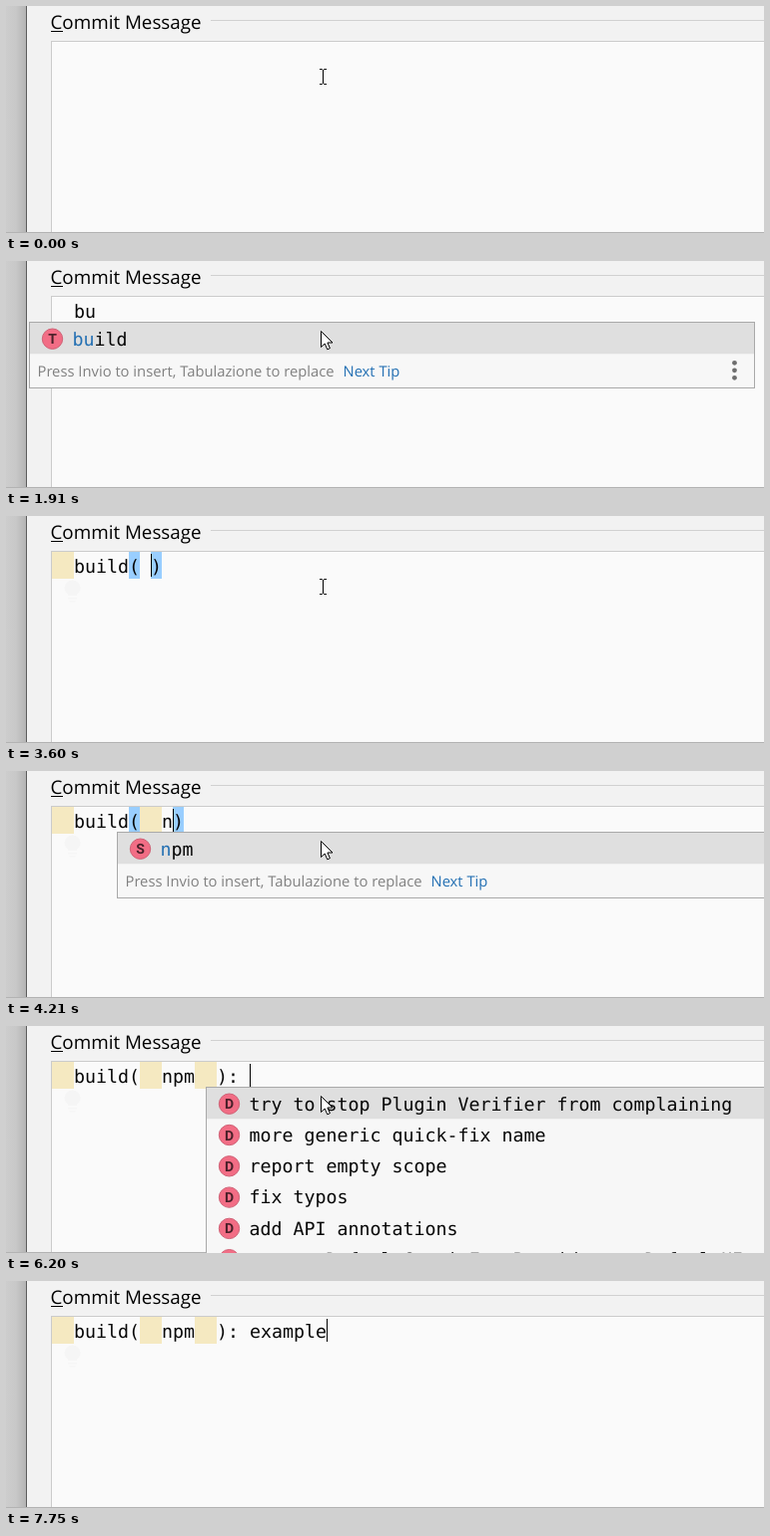
Animation of 759x228 px, one loop 8000 ms. Source, as an HTML page:

```html
<!DOCTYPE html>
<html lang="en">
<head>
<meta charset="utf-8">
<title>Commit message completion</title>
<style>
  html, body { margin: 0; width: 100%; height: 100%; overflow: hidden; background: #f2f2f2; }
  svg { display: block; width: 759px; height: 228px; }
  text { white-space: pre; text-rendering: geometricPrecision; }
  .ui { font-family: "Open Sans", "Noto Sans", sans-serif; }
  .code { font: 18.27px "DejaVu Sans Mono", monospace; fill: #080808; }
  .letter { font: 700 14px Roboto, Arial, sans-serif; fill: #4a2029; text-anchor: middle; }
  .hit { fill: #2470b3; }
</style>
</head>
<body>
<svg viewBox="0 0 759 228" xmlns="http://www.w3.org/2000/svg">
  <defs>
    <linearGradient id="shade">
      <stop offset="0" stop-color="#cdcdcd"/>
      <stop offset=".5" stop-color="#c8c8c8"/>
      <stop offset="1" stop-color="#b4b4b4"/>
    </linearGradient>
  </defs>
  <rect width="759" height="228" fill="#f2f2f2"/>
  <rect width="20" height="228" fill="url(#shade)"/>
  <rect x="20" width="1" height="228" fill="#5c5c5c"/>
  <text class="ui" x="44.5" y="23" font-size="18.8">Commit Message</text>
  <rect x="45" y="25" width="12" height="1"/>
  <rect x="205" y="14" width="554" height="1" fill="#d1d1d1"/>
  <rect x="45.5" y="35.5" width="720" height="200" fill="#fafafa" stroke="#cbcbcb"/>
  <rect y="227" width="759" height="1" fill="#b3b3b3"/>
  <g id="scene"></g>
</svg>
<script>
const LOOP = 8000, LEFT = 46, CHAR = 11, ROW = 31.3;
const scene = document.getElementById('scene');

const popup = (x, icon, hit, items) => ({ x, icon, hit, items });
const scopes = ['gulp', 'broccoli', 'npm'];
const recent = [
  'try to stop Plugin Verifier from complaining',
  'more generic quick-fix name',
  'report empty scope',
  'fix typos',
  'add API annotations',
  'rename DefaultCommitFormProvider to DefaultUI'
];
const withE = [
  'extract completion logic',
  'enable scope inspection',
  'report empty scope',
  'ensure footer is separated',
  'handle end of line',
  'improve error messages'
];
const head = '  build(  npm  ): ';
const indent = [0, 2], before = [8, 2];

// Each step lists only what changes; marks are [column, length].
const steps = [
  [0, { text: '', caret: -1, mouse: 'beam', marks: [], parens: false, bulb: '', popup: null }],
  [180, { text: ' ', caret: 1, mouse: '' }],
  [360, { text: '  ', caret: 2 }],
  [790, { text: '  b', caret: 3, mouse: 'arrow', popup: popup(23, 'T', 'b', ['build']) }],
  [970, { text: '  bu', caret: 4, popup: popup(23, 'T', 'bu', ['build']) }],
  [1910, { caret: -1 }],
  [2030, { text: '  build', caret: 7, mouse: 'beam', popup: null }],
  [2340, { marks: [indent] }],
  [2790, { bulb: 'on' }],
  [2910, { caret: -1 }],
  [3090, { text: '  build()', caret: 8, parens: true, bulb: 'faint', mouse: 'arrow', popup: popup(90, 'S', '', scopes) }],
  [3600, { text: '  build( )', caret: 9, mouse: 'beam', popup: null }],
  [3780, { text: '  build(  )', caret: 10, mouse: '' }],
  [3900, { marks: [indent, before] }],
  [4210, { text: '  build(  n)', caret: 11, mouse: 'arrow', popup: popup(111, 'S', 'n', ['npm']) }],
  [4390, { text: '  build(  np)', caret: 12, popup: popup(111, 'S', 'np', ['npm']) }],
  [4640, { text: '  build(  npm)', caret: 13, marks: [indent, [8, 5]], mouse: 'beam', popup: null }],
  [4890, { text: '  build(  npm )', caret: 14, mouse: '' }],
  [4950, { text: '  build(  npm  )', caret: 15 }],
  [5010, { marks: [indent, before, [13, 1]] }],
  [5320, { marks: [indent, before, [13, 2]] }],
  [5820, { caret: 16 }],
  [6200, { text: head, caret: 18, parens: false, mouse: 'arrow', popup: popup(200, 'D', '', recent) }],
  [6810, { text: head + 'e', caret: 19, popup: popup(200, 'D', 'e', withE) }],
  [7060, { text: head + 'ex', caret: 20, popup: popup(200, 'D', 'ex', withE.slice(0, 1)) }],
  [7240, { text: head + 'exa', caret: 21, mouse: '', popup: null }],
  [7310, { text: head + 'exam', caret: 22 }],
  [7560, { text: head + 'examp', caret: 23 }],
  [7655, { text: head + 'exampl', caret: 24 }],
  [7750, { text: head + 'example', caret: 25 }]
];
let last = {};
const states = steps.map(([time, change]) => last = { ...last, ...change, time });

const rect = (x, y, w, h, fill, more = '') =>
  `<rect x="${x}" y="${y}" width="${w}" height="${h}" fill="${fill}" ${more}/>`;
const circle = (x, y, r, fill, more = '') =>
  `<circle cx="${x}" cy="${y}" r="${r}" fill="${fill}" ${more}/>`;
const code = (x, y, content) => `<text class="code" x="${x}" y="${y}">${content}</text>`;
const block = (col, count, fill) => rect(LEFT + col * CHAR, 36, count * CHAR, 27, fill);

function drawBulb(mode) {
  if (!mode) return '';
  const on = mode === 'on';
  const base = on ? '#6e6e6e' : '#f6f6f6';
  return `<path d="M62 80V78.5Q58.5 76 58.5 72.3A8 7.8 0 0 1 74.5 72.3Q74.5 76 71 78.5V80Z" fill="${on ? '#eda200' : '#f5f5f5'}"/>`
    + rect(62, 82, 9, 1.4, base) + rect(63.5, 85, 6, 1.4, base);
}

function drawRow(list, item, i) {
  const y = 62 + i * ROW, mid = y + 16.2;
  const label = list.hit
    ? item.replace(new RegExp('\\b' + list.hit), '<tspan class="hit">$&</tspan>')
    : item;
  return (i ? '' : rect(list.x + 1, y, 725, ROW, '#dfdfdf'))
    + circle(list.x + 23.5, mid, 10.2, '#f26d85', 'stroke="#cf6276"')
    + `<text class="letter" x="${list.x + 23.5}" y="${mid + 5}">${list.icon}</text>`
    + code(list.x + 43.5, y + 22.5, label);
}

function drawPopup(list) {
  if (!list) return '';
  const { x, items } = list;
  const foot = 62 + items.length * ROW;
  const hint = (dx, fill, words) =>
    `<text class="ui" font-size="14.77" x="${x + dx}" y="${foot + 22.7}" fill="${fill}">${words}</text>`;
  return rect(x + .5, 61.5, 726, Math.round(foot + 34) - 61, '#f7f7f7', 'stroke="#a9a9a9"')
    + items.map((item, i) => drawRow(list, item, i)).join('')
    + hint(8.5, '#808080', 'Press Invio to insert, Tabulazione to replace')
    + hint(314.5, '#2470b3', 'Next Tip')
    + [9, 16.5, 24].map(dy => circle(x + 706.5, foot + dy, 2.4, '#6e6e6e')).join('');
}

const pointers = {
  '': '',
  beam: '<path d="M314 63.5H316.5L317.5 64.5L318.5 63.5H321M317.5 64V78M314 78.5H316.5L317.5 77.5L318.5 78.5H321" fill="none" stroke="#000"/>',
  arrow: '<path d="M315.5 70.5V86.5L319.2 83L321.8 88.8L324.4 87.6L321.9 82H327Z" fill="#fff" stroke="#000"/>'
};

function draw(s) {
  const parens = s.parens ? [s.text.indexOf('('), s.text.indexOf(')')] : [];
  scene.innerHTML = s.marks.map(([col, count]) => block(col, count, '#f5e9c1')).join('')
    + parens.map(col => block(col, 1, '#99ceff')).join('')
    + code(LEFT, 57, s.text)
    + (s.caret < 0 ? '' : rect(LEFT + s.caret * CHAR, 38, 1, 23, '#000'))
    + drawBulb(s.bulb) + drawPopup(s.popup) + pointers[s.mouse];
}

let shown;
function tick() {
  const time = performance.now() % LOOP;
  const state = states.findLast(s => s.time <= time);
  if (state !== shown) draw(shown = state);
  requestAnimationFrame(tick);
}
tick();
</script>
</body>
</html>
```
